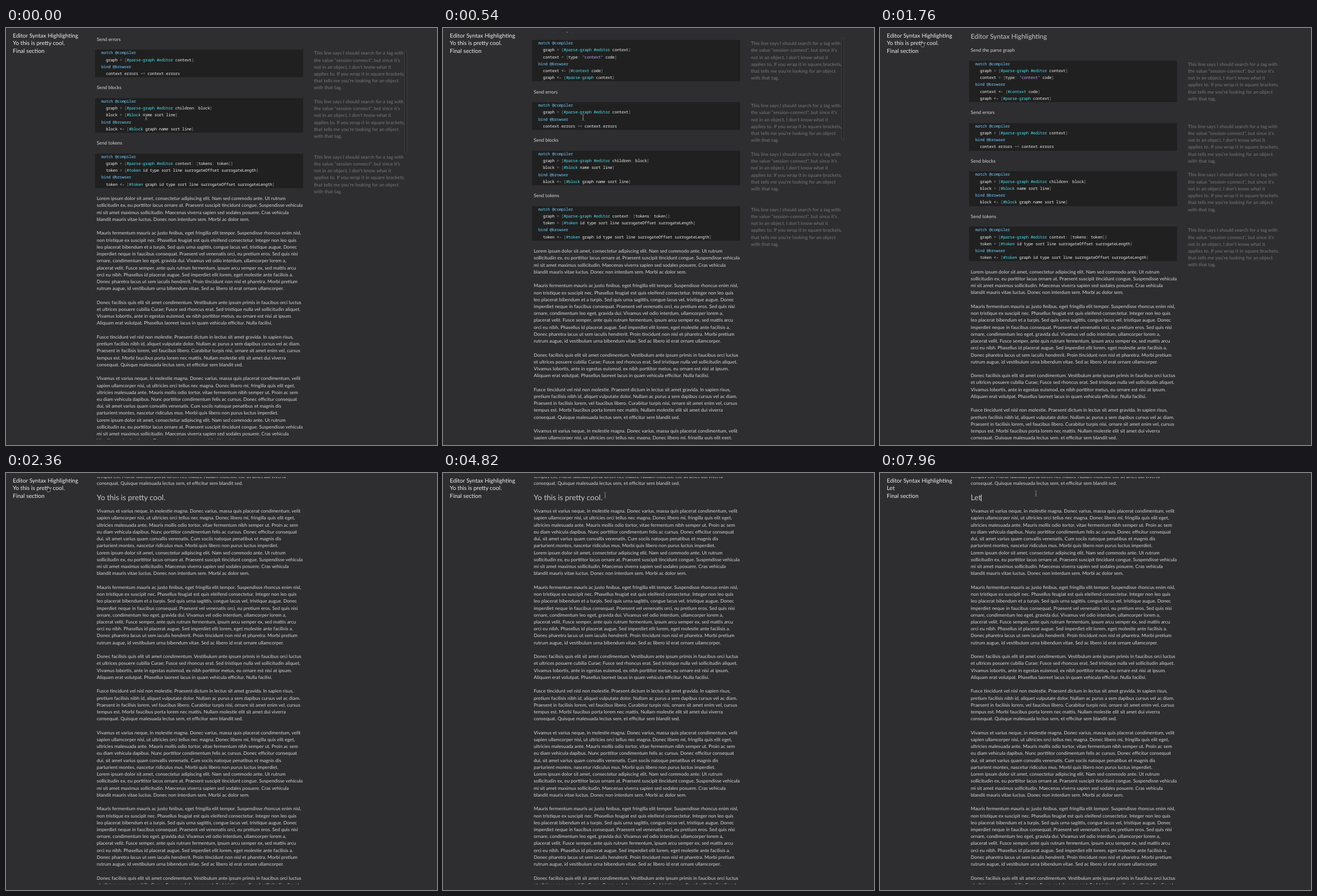
Write an HTML page that moves like this. It is 760 by 737 pixels and loops after 8 s.

```html
<!DOCTYPE html>
<html lang="en">
<head>
<meta charset="utf-8">
<title>Editor Syntax Highlighting</title>
<style>
  html, body { margin: 0; width: 100%; height: 100%; overflow: hidden; background: #2e2e30; }
  body {
    position: relative; color: #d6d6d7; white-space: pre;
    font: 8.4px/12.234px Lato, "Open Sans", sans-serif;
    text-rendering: geometricPrecision;
  }
  body div { position: absolute; }
  #toc { left: 12px; top: 7.6px; font-size: 10.15px; line-height: 13.5px; color: #f0f0f0; }
  #toc span { display: block; height: 13.5px; }
  #pane { left: 0; top: 7px; width: 760px; height: 720px; overflow: hidden; }
  #doc { left: 0; top: 0; width: 760px; }
  .text { left: 160px; }
  .head { left: 160px; color: #c8c8c9; }
  .code {
    left: 157px; width: 356px; padding-left: 11px; background: #202021; color: #f0f0f0;
    font: 500 7.2px/12.234px "Noto Sans Mono", "DejaVu Sans Mono", monospace; letter-spacing: -.24px;
  }
  .note { left: 543px; color: #79797b; letter-spacing: .05px; }
  .key { color: #74cbfa; }
  .tag { color: #4ee2ee; }
  .str { color: #c0a0f6; }
  .op { color: #8e8e90; }
  #caret { display: inline-block; width: 1px; height: 12px; margin-right: -1px; vertical-align: -2px; background: #dcdcdc; }
  #bar { left: 703px; width: 2px; height: 179px; border: 1px solid #48484a; border-radius: 2px; background: #1a1a1b; }
  svg { position: absolute; left: 0; top: 0; width: 20px; height: 20px; overflow: visible; }
  svg path { fill: none; stroke-linejoin: round; }
</style>
</head>
<body>
<div id="toc"><span>Editor Syntax Highlighting</span><span id="entry"></span><span>Final section</span></div>
<div id="pane"><div id="doc"></div></div>
<div id="bar"></div>
<svg id="mouse">
  <g id="beam">
    <path d="M-2.6-5.4Q0-5.4 0-3.6V3.6Q0 5.4-2.6 5.4M2.6-5.4Q0-5.4 0-3.6V3.6Q0 5.4 2.6 5.4M-1.5 2.2H1.5" stroke="#1c1c1d" stroke-width="2"/>
    <path d="M-2.6-5.4Q0-5.4 0-3.6V3.6Q0 5.4-2.6 5.4M2.6-5.4Q0-5.4 0-3.6V3.6Q0 5.4 2.6 5.4M-1.5 2.2H1.5" stroke="#767678" stroke-width=".9"/>
  </g>
  <g id="hand">
    <path d="M-1.6 5.4L-3.4 1.6Q-3.4.2-1.9 1.2V-4.4Q-1.2-5.8-.4-4.4V-1.4Q2.8-1.6 3.2.4V3L2.3 5.4Z" style="fill:#242425" stroke="#a2a2a4" stroke-width=".8"/>
  </g>
  <g id="plus">
    <path d="M-4.8 0H4.8M0-4.8V4.8" stroke="#e0e0e0" stroke-width="3"/>
    <path d="M-4 0H4M0-4V4" stroke="#2a2a2b" stroke-width="1.1"/>
  </g>
</svg>
<script>
const $ = id => document.getElementById(id);
const LOOP = 8000, PITCH = 12.234, TOP = 33.2 - 7;
const TITLE = "Yo this is pretty cool.";

const lorem = `Lorem ipsum dolor sit amet, consectetur adipiscing elit. Nam sed commodo ante. Ut rutrum
sollicitudin ex, eu porttitor lacus ornare at. Praesent suscipit tincidunt congue. Suspendisse vehicula
mi sit amet maximus sollicitudin. Maecenas viverra sapien sed sodales posuere. Cras vehicula
blandit mauris vitae luctus. Donec non interdum sem. Morbi ac dolor sem.

Mauris fermentum mauris ac justo finibus, eget fringilla elit tempor. Suspendisse rhoncus enim nisl,
non tristique ex suscipit nec. Phasellus feugiat est quis eleifend consectetur. Integer non leo quis
leo placerat bibendum et a turpis. Sed quis urna sagittis, congue lacus vel, tristique augue. Donec
imperdiet neque in faucibus consequat. Praesent vel venenatis orci, eu pretium eros. Sed quis nisi
ornare, condimentum leo eget, gravida dui. Vivamus vel odio interdum, ullamcorper lorem a,
placerat velit. Fusce semper, ante quis rutrum fermentum, ipsum arcu semper ex, sed mattis arcu
orci eu nibh. Phasellus id placerat augue. Sed imperdiet elit lorem, eget molestie ante facilisis a.
Donec pharetra lacus ut sem iaculis hendrerit. Proin tincidunt non nisl et pharetra. Morbi pretium
rutrum augue, id vestibulum urna bibendum vitae. Sed ac libero id erat ornare ullamcorper.

Donec facilisis quis elit sit amet condimentum. Vestibulum ante ipsum primis in faucibus orci luctus
et ultrices posuere cubilia Curae; Fusce sed rhoncus erat. Sed tristique nulla vel sollicitudin aliquet.
Vivamus lobortis, ante in egestas euismod, ex nibh porttitor metus, eu ornare est nisi at ipsum.
Aliquam erat volutpat. Phasellus laoreet lacus in quam vehicula efficitur. Nulla facilisi.

Fusce tincidunt vel nisl non molestie. Praesent dictum in lectus sit amet gravida. In sapien risus,
pretium facilisis nibh id, aliquet vulputate dolor. Nullam ac purus a sem dapibus cursus vel ac diam.
Praesent in facilisis lorem, vel faucibus libero. Curabitur turpis nisi, ornare sit amet enim vel, cursus
tempus est. Morbi faucibus porta lorem nec mattis. Nullam molestie elit sit amet dui viverra
consequat. Quisque malesuada lectus sem, et efficitur sem blandit sed.`;

const vivamus = `Vivamus et varius neque, in molestie magna. Donec varius, massa quis placerat condimentum, velit
sapien ullamcorper nisi, ut ultricies orci tellus nec magna. Donec libero mi, fringilla quis elit eget,
ultricies malesuada ante. Mauris mollis odio tortor, vitae fermentum nibh semper ut. Proin ac sem
eu diam vehicula dapibus. Nunc porttitor condimentum felis ac cursus. Donec efficitur consequat
dui, sit amet varius quam convallis venenatis. Cum sociis natoque penatibus et magnis dis
parturient montes, nascetur ridiculus mus. Morbi quis libero non purus luctus imperdiet.`;

const note = `This line says I should search for a tag with
the value "session-connect", but since it's
not in an object, I don't know what it
applies to. If you wrap it in square brackets,
that tells me you're looking for an object
with that tag.`;

// [row of the caption, caption, code]
const sections = [
  [0, "Send the parse graph", `match @compiler
  graph = [#parse-graph #editor context]
  context = [type: "context" code]
bind @browser
  context <- [#context code]
  graph <- [#parse-graph context]`],
  [9, "Send errors", `match @compiler
  graph = [#parse-graph #editor context]
bind @browser
  context.errors += context.errors`],
  [16, "Send blocks", `match @compiler
  graph = [#parse-graph #editor children: block]
  block = [#block name sort line]
bind @browser
  block <- [#block graph name sort line]`],
  [24, "Send tokens", `match @compiler
  graph = [#parse-graph #editor context: [tokens: token]]
  token = [#token id type sort line surrogateOffset surrogateLength]
bind @browser
  token <- [#token graph id type sort line surrogateOffset surrogateLength]`],
];

function place(row, kind, text) {
  const el = document.createElement("div");
  el.className = kind;
  el.style.top = TOP + row * PITCH + "px";
  el.textContent = text;
  $("doc").append(el);
  return el;
}

function heading(row, size, text) {
  const el = place(row, "head", text);
  el.style.fontSize = size + "px";
  return el;
}

function paint(code) {
  const kinds = ["key", "tag", "str", "op"];
  return code.replace(/<-/g, "&lt;-").replace(
    /((?:match|bind) @\w+)|(#[\w-]+)|("[^"]*")|([[\]=:.+]+)/g,
    (part, ...groups) => `<span class="${kinds[groups.findIndex((g, i) => i < 4 && g)]}">${part}</span>`);
}

heading(-2, 11.8, "Editor Syntax Highlighting");
for (const [row, caption, code] of sections) {
  place(row, "text", caption);
  place(row + 2, "code", "").innerHTML = paint(code);
  place(row + 2, "note", note);
}
for (const row of [32, 64, 98, 130]) place(row, "text", lorem);
for (const row of [58, 92, 124]) place(row, "text", vivamus);

const title = heading(90, 13.4, "");
const words = document.createElement("span");
const caret = document.createElement("span");
caret.id = "caret";
title.append(words, caret);

const cut = n => TITLE.slice(0, n);
const both = text => ({ title: text, entry: text });
const at = (x, y, shape) => shape ? { x, y, shape } : { x, y };

// Each step changes part of the state and holds until the next.
const steps = [
  [0, { ...at(247, 157, "beam"), ...both(TITLE), scroll: 129.5, bar: true, caret: false }],
  [300, { scroll: 88 }],
  [540, { ...at(247, 158), scroll: 36.6 }],
  [740, { scroll: 0 }],
  [890, at(196, 88)],
  [1040, at(128, 26)],
  [1310, { ...at(83.5, 8), bar: false }],
  [1460, at(82, 14, "hand")],
  [1610, at(78, 22)],
  [1760, at(75, 28)],
  [2360, { scroll: 1097.5 }],
  [2510, { bar: true }],
  [3020, { bar: false }],
  [3320, at(100, 37)],
  [3470, at(140, 54, "beam")],
  [3620, at(176, 57)],
  [3760, at(195, 50)],
  [4050, at(195, 51)],
  [4500, at(220, 47)],
  [4650, at(258, 41)],
  [4820, at(286, 39)],
  [4970, at(281, 37)],
  [5130, at(275, 36)],
  [5280, { shape: "plus" }],
  [5430, { caret: true }],
  ...[21, 19, 17, 15, 13, 11].map((n, i) => [5730 + i * 150, both(cut(n))]),
  [6630, { title: cut(8) }],
  [6780, { entry: cut(8) }],
  [7070, both(cut(3))],
  [7370, { ...both(""), shape: "beam" }],
  [7810, both("L")],
  [7960, both("Let")],
];

function draw(time) {
  const now = Object.assign({}, ...steps.filter(s => s[0] <= time).map(s => s[1]));
  $("doc").style.top = -now.scroll + "px";
  $("bar").style.top = 7.4 + now.scroll * .2566 + "px";
  $("bar").hidden = !now.bar;
  words.textContent = now.title;
  $("entry").textContent = now.entry;
  caret.style.visibility = now.caret ? "visible" : "hidden";
  $("mouse").style.transform = `translate(${now.x}px, ${now.y}px)`;
  for (const shape of ["beam", "hand", "plus"])
    $(shape).style.display = shape === now.shape ? "inline" : "none";
}

const start = performance.now();
function tick() {
  draw((performance.now() - start) % LOOP);
  requestAnimationFrame(tick);
}
tick();
</script>
</body>
</html>
```
